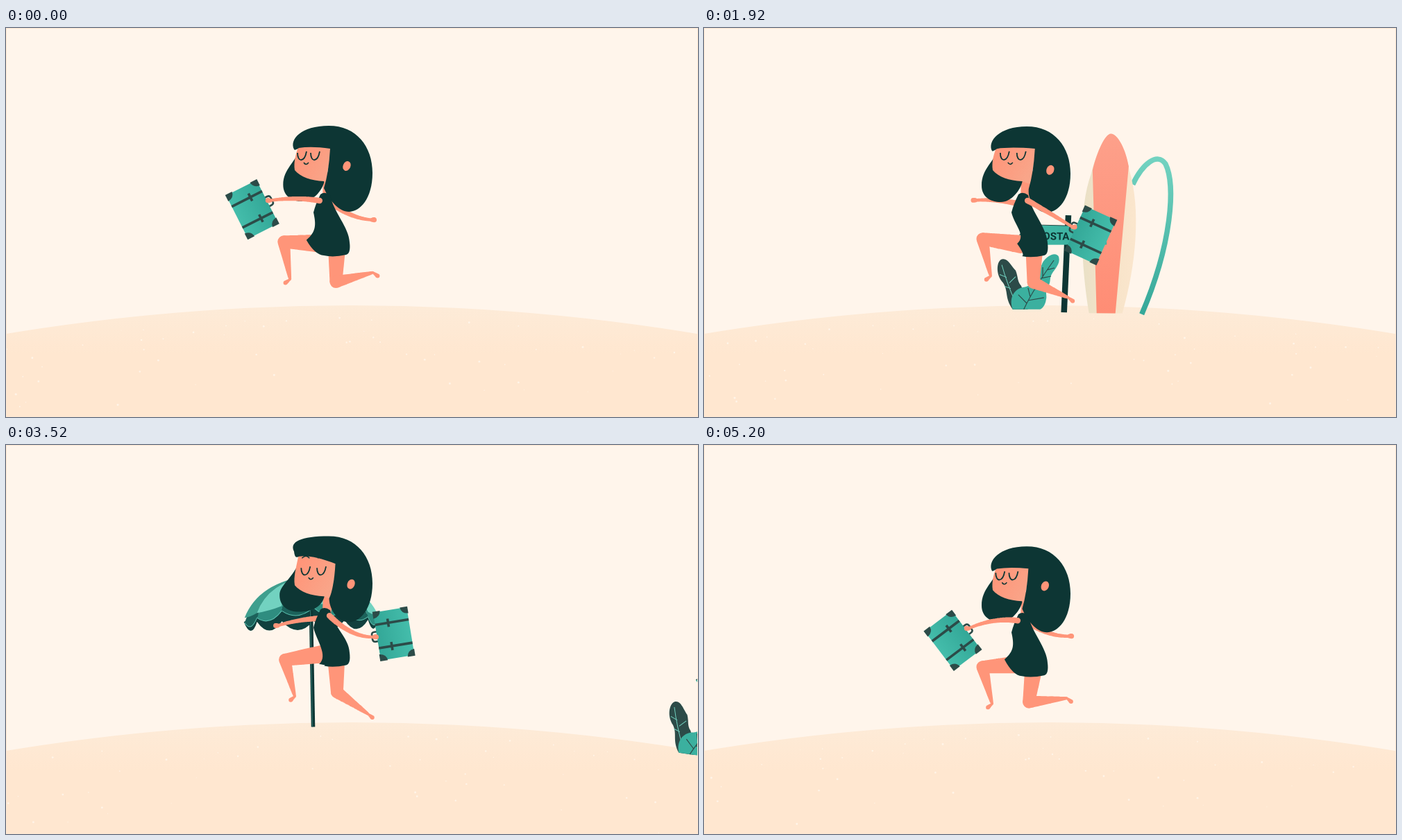
Recreate the animation shown at these times as an HTML page with a canvas. Size 997 by 561 pixels, loop 5280 ms.

```html
<!DOCTYPE html>
<html lang="en">
<head>
<meta charset="utf-8">
<title>Beach walk</title>
<style>
html, body { margin: 0; height: 100%; overflow: hidden; background: #fff5eb; }
canvas { display: block; width: 100vw; height: 100vh; }
</style>
</head>
<body>
<canvas id="stage" width="997" height="561"></canvas>
<script>
const ctx = document.getElementById('stage').getContext('2d');
const { sin, cos, tanh, min, max, hypot, sqrt, floor, PI } = Math;
const LOOP = 5280, STEP = 80, WALK = 1320, RADIUS = 3045;
const HAIR = '#0d3634', DARK = '#2c4b48', SKIN = '#ff9579', TEAL = '#3bb09f', MINT = '#72d2c0';

function fill(d, color) {
  ctx.fillStyle = color;
  ctx.fill(new Path2D(d));
}
function line(d, color, width) {
  ctx.strokeStyle = color;
  ctx.lineWidth = width;
  ctx.stroke(new Path2D(d));
}
function dot(x, y, r, color) {
  ctx.fillStyle = color;
  ctx.beginPath();
  ctx.arc(x, y, r, 0, 7);
  ctx.fill();
}
function blend(x0, y0, x1, y1, ...colors) {
  const g = ctx.createLinearGradient(x0, y0, x1, y1);
  colors.forEach((c, i) => g.addColorStop(i / (colors.length - 1), c));
  return g;
}
function placed(x, y, angle, draw) {
  ctx.save();
  ctx.translate(x, y);
  ctx.rotate(angle);
  draw();
  ctx.restore();
}

// Tapered stroke between two points, sagging by bend in the middle.
function limb(x0, y0, x1, y1, r0, r1, bend = 0) {
  ctx.fillStyle = SKIN;
  ctx.beginPath();
  for (let u = 0; u <= 1; u += .02) {
    const x = x0 + (x1 - x0) * u, y = y0 + (y1 - y0) * u + 2 * bend * u * (1 - u);
    const r = r0 + (r1 - r0) * u;
    ctx.moveTo(x + r, y);
    ctx.arc(x, y, r, 0, 7);
  }
  ctx.fill();
}

// reach: 1 in front, -1 behind; side: 1 far leg, -1 near leg.
function leg(reach, q, side, top) {
  const hx = 466 - 11 * reach, hy = top + 170;
  const ax = 469 - 61 * reach;
  const ay = min(407, top + 223 - 5 * reach + side * (10 - 6 * reach)
    + (45 + 10 * q) * (1 - reach * reach) + 8 * q * reach);
  // two equal bones, knee pointing forward
  const dx = ax - hx, dy = ay - hy, d = hypot(dx, dy);
  const out = sqrt(max(0, 55 ** 2 - d * d / 4)) / d;
  const kx = (hx + ax) / 2 - dy * out, ky = (hy + ay) / 2 + dx * out;
  limb(hx, hy, kx, ky, 13, 9);
  limb(kx, ky, ax, ay, 9, 2);
  limb(ax, ay, ax - 7 * reach, ay + 5, 1.6, 3);
}

function arm(sx, sy, hx, hy, bend) {
  limb(sx, sy, hx, hy, 4.2, 2.1, bend);
  limb(hx, hy, hx + 3 * Math.sign(hx - sx), hy, 3, 3.5);
}

function suitcase() {
  line('M5-7H1Q-3-7-3-3V3Q-3 7 1 7H5', DARK, 2.6);
  fill('M4-35H53V35H4Z', blend(4, 0, 53, 0, '#33a797', '#44bdab'));
  for (const s of [-1, 1]) {
    line(`M4 ${s * 17}H53M23 ${s * 17 - 6}v12`, DARK, 3.6);
    for (const [x, k] of [[4, 1], [53, -1]])
      fill(`M${x - k} ${-36 * s}h${11 * k}q${-k} ${9 * s} ${-11 * k} ${10 * s}Z`, DARK);
  }
}

function head(top, lag, turn) {
  const eye = top + 47 + 4 * lag, fringe = top + 22.5 - 7 * lag;
  const brow = (fringe + eye) / 2 - 4, edge = 467 + 10 * turn;
  const lockX = 397 - 3 * lag, lockY = top + 109, back = top + 124;

  fill(`M457 ${eye + 28}L${edge} ${eye + 20}L468 ${top + 112}L456 ${top + 110}Z`, SKIN);
  fill(`M426 ${brow - 3}C418 ${eye + 8} ${lockX} ${eye + 18} ${lockX} ${lockY - 24}
    C${lockX} ${lockY - 8} ${lockX + 12} ${lockY} ${lockX + 28} ${lockY}
    C442 ${lockY} 456 ${eye + 50} 459 ${eye + 35}L440 ${eye + 15}Z`, HAIR);
  fill(`M422 ${brow - 4}L${edge + 3} ${eye - 14}L${edge - 7} ${eye + 40}L458 ${eye + 36}
    C440 ${eye + 35} 424 ${eye + 30} 416 ${eye + 20}C414 ${eye + 8} 418 ${eye - 5} 422 ${brow - 4}Z`,
    blend(415, eye, 465, eye + 30, SKIN, '#f9a589'));
  for (const x of [426 + 7 * turn, 445 + 12 * turn]) {
    line(`M${x - 5} ${eye - 19}q6-6 11 0`, HAIR, 1.5);
    line(`M${x - 6} ${eye - 5}C${x - 6} ${eye + 9} ${x + 4} ${eye + 9} ${x + 7} ${eye - 7}`, HAIR, 1.8);
  }
  line(`M${429 + 9 * turn} ${eye + 9}q3 5 7 0`, HAIR, 1.6);

  fill(`M415 ${fringe + 6}C408 ${fringe - 8} 425 ${top} 465 ${top}
    C505 ${top} 528 ${top + 30} 528 ${top + 68}C528 ${top + 105} 510 ${back} 494 ${back}
    C480 ${back} 466 ${back - 16} ${458 + 10 * turn} ${back - 34}
    Q${edge - 2} ${eye + 24} ${edge} ${eye - 11}Q440 ${brow - 3} 422 ${brow}Q416 ${brow + 4} 415 ${fringe + 6}Z`, HAIR);
  placed(491 + 8 * turn, eye + 14 + 6 * turn, .4, () => {
    ctx.scale(.75, 1);
    dot(0, 0, 7.2, SKIN);
  });
}

function walker(t) {
  const w = 2 * PI * (t / WALK - .05);
  const c = cos(w), q = sin(w);
  const f = tanh(3 * c) / .97;            // suitcase arm: 1 in front, -1 behind
  const stride = tanh(1.3 * c) / .862;
  const lag = sin(2 * w - .25);           // hair and cloth trail the hop
  const top = 142 + 2 * f - (11 - 4 * f) * cos(2 * w - .5);
  const neck = top + 100 + 4 * lag, hem = top + 188;
  const hemX = 442 - 9 * f, hemY = hem - 14 + 8 * lag - 3 * f;

  arm(460 + 9 * f, neck + 15, 459 + 67 * f, top + 129 + 12 * f + 18 * q * f, 3 + 7 * f);
  leg(stride, q, 1, top);
  leg(-stride, -q, -1, top);
  head(top, lag, (1 - cos(w + .3)) / 2);
  fill(`M453 ${neck + 2}Q459 ${neck - 3} 467 ${neck + 3}C472 ${neck + 28} 494 ${hem - 42} 495 ${hem - 20}
    Q497 ${hem - 4} 490 ${hem - 2}Q472 ${hem + 2} 458 ${hem - 1}Q${hemX + 12} ${hem - 2} ${hemX} ${hemY}
    C${hemX + 14} ${hemY - 12} 447 ${neck + 46} 443 ${neck + 28}Q446 ${neck + 16} 453 ${neck + 2}Z`, HAIR);

  const handX = 456 - 74 * f, handY = top + 124.5 - 19.5 * f + (18 + 15 * f) * q * q;
  placed(handX, handY, (85 + 75 * f + 28 * q) * PI / 180, suitcase);
  arm(459 - 7 * f, neck + 11, handX, handY, 3 - 4 * f + 14 * q * f);
}

function signGroup() {
  line('M98-185C112-215 133-232 145-215C160-185 155-100 112 2', blend(0, -220, 0, 0, MINT, '#35a899'), 7.5);

  // surfboard
  fill('M36 1C24-70 20-150 38-200C46-232 58-258 66-258C76-258 88-235 93-205C110-150 104-70 84 1Z',
    blend(24, 0, 104, 0, '#e8e0c6', '#f6e3c8', '#fbe6cd'));
  fill('M47 1L40-205C46-232 58-258 66-258C76-258 88-235 92-211L74 1Z', blend(0, -258, 0, 0, '#fda08a', '#ff8d75'));

  // plant
  fill(`M-74-4C-86-20-80-30-88-42C-100-55-97-74-90-76C-82-79-76-66-70-60C-66-50-68-45-62-38
    C-56-25-52-10-52-4Z`, DARK);
  line('M-90-68Q-82-40-70-14M-83-50l-10-4M-79-42l9-9M-77-34l-9-3M-73-25l9-8', MINT, 1);
  fill(`M-74-4C-80-20-72-34-58-36C-54-36-48-40-44-44C-38-50-36-60-32-70C-26-82-12-88-8-80
    C-5-70-14-62-18-55C-22-48-18-44-24-36C-28-28-24-24-26-18C-27-10-32-4-36-4Z`, TEAL);
  line('M-58-4Q-44-34-15-75M-54-13l-12-12M-49-23l-3-12M-40-38l-1-9M-31-51v-14M-51-17l22-4M-43-33l18-4M-33-49l14-3M-25-61l11-3', DARK, 1.2);

  // signpost
  line('M0 0L5.5-140', HAIR, 8.5);
  fill('M-65-111L-50-126L60-124L61-98L-53-97Z', blend(-65, 0, 61, 0, '#43b8a6', TEAL));
  line('M-65-111L-50-126L60-124', DARK, 1);
  ctx.fillStyle = HAIR;
  ctx.font = 'bold 15px Roboto, "Liberation Sans", sans-serif';
  ctx.textAlign = 'center';
  ctx.textBaseline = 'middle';
  ctx.fillText('COSTA RICA', 2, -109);
}

function umbrella() {
  const rimX = i => 97 * sin(.035 + .485 * (i - 3));
  const rimY = x => -172 + 20 * (x / 96) ** 2;

  let skirt = 'M-97-153';
  for (let i = 1; i < 7; i++)
    skirt += `Q${(rimX(i) + rimX(i - 1)) / 2} -127 ${rimX(i)} -153`;
  fill(skirt + 'Q0-210-97-153Z', '#11403e');
  line('M0 0V-168', HAIR, 5.5);
  line('M-1 0V-168', '#2f6f69', 1.2);

  function panel(i, lift, sag, color) {
    const a = rimX(i), b = rimX(i + 1), ya = rimY(a) - lift, yb = rimY(b) - lift;
    const scallop = `${a} ${ya}Q${(a + b) / 2} ${(ya + yb) / 2 + sag} ${b} ${yb}`;
    fill(`M-2-218Q${a * .78}-210 ${scallop}Q${b * .78}-210-2-218Z`, color);
    return 'M' + scallop;
  }
  for (let i = 0; i < 6; i++) {
    line(panel(i, 0, 18, i % 2 ? '#2f8d80' : '#1c625b'), '#5bbfae', 1);
    panel(i, 7, 2, i % 2 ? MINT : '#3f9f8e');
  }
}

const groundY = x => 400 + (x - 498) ** 2 / (2 * RADIUS);
function onGround(x, sink, lean, draw) {
  placed(x, groundY(x) + sink, lean * (x - 498) / RADIUS, draw);
}

let seed = 7;
const random = () => (seed = seed * 16807 % 2147483647) / 2147483647;
const specks = Array.from({ length: 90 }, () => [random() * 1800, 18 + 110 * random() ** 2, .5 + random()]);

function ground(t) {
  ctx.fillStyle = blend(0, 400, 0, 470, '#fdebd8', '#ffe7d0');
  ctx.beginPath();
  ctx.arc(498, 400 + RADIUS, RADIUS, 0, 7);
  ctx.fill();
  for (const [start, depth, r] of specks) {
    const x = (start + 1800 * t / LOOP) % 1800 - 400;
    dot(x, groundY(x) + depth, r, 'rgba(255,247,238,.8)');
  }
}

function frame(now) {
  const t = floor(now % LOOP / STEP) * STEP;
  ctx.fillStyle = '#fff5eb';
  ctx.fillRect(0, 0, 997, 561);
  ctx.lineCap = 'butt';
  ground(t);
  const signX = 101 + .339 * (t - 720) + 11 * sin(PI * (t - 720) / 2200);
  const shadeX = 161 + .391 * (t - 2800);
  onGround(signX, 10, .83, signGroup);
  onGround(shadeX, 6 + (shadeX - 443) / 100, 1, umbrella);
  walker(t);
  ctx.strokeStyle = '#fde8d3';
  ctx.lineWidth = 1;
  ctx.strokeRect(.5, .5, 996, 560);
}

const begin = performance.now();
function tick() {
  frame(performance.now() - begin);
  requestAnimationFrame(tick);
}
tick();
</script>
</body>
</html>
```
